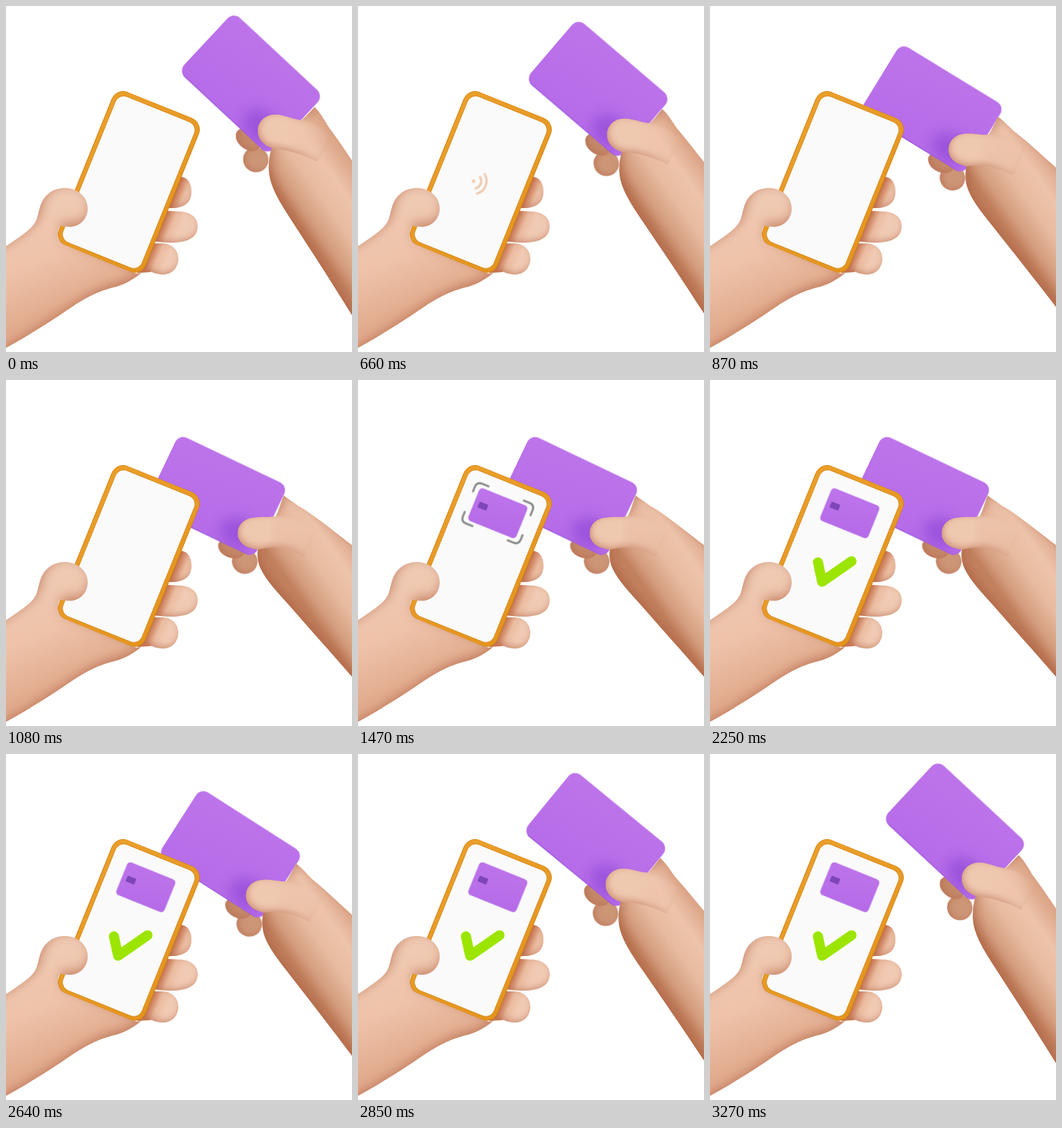
An HTML page that plays this animation: 500x500 px, repeating every 3.3 s.

```html
<!DOCTYPE html>
<html lang="en">
<head>
<meta charset="utf-8">
<title>Card payment</title>
<style>
html, body { margin: 0; width: 100%; height: 100%; overflow: hidden; background: #fff; }
svg { display: block; width: 100vw; height: 100vh; }
.a { animation: 3300ms linear infinite; }

/* The card hand approaches 530-1090 ms and leaves 2300-3080 ms. */
.card { animation-name: card; }
.index { animation-name: index; }
.middle { animation-name: middle; }
.arm { animation-name: arm; }
.thumb { animation-name: thumb; }
.card, .index, .middle, .arm, .thumb { animation-timing-function: cubic-bezier(.333, 0, .667, 1); }

@keyframes card {
  0%, 16.06%, 93.33%, 100% { transform: translate(354px, 112px) rotate(43deg) scale(1); }
  33.03%, 69.7% { transform: translate(304px, 167.5px) rotate(25.5deg) scale(.98); }
}
@keyframes index {
  0%, 16.06%, 93.33%, 100% { transform: translate(350px, 193px) rotate(38deg); }
  33.03%, 69.7% { transform: translate(326px, 243px) rotate(20deg); }
}
@keyframes middle {
  0%, 16.06%, 93.33%, 100% { transform: translate(361px, 222px) rotate(38deg); }
  33.03%, 69.7% { transform: translate(345px, 262px) rotate(20deg); }
}
@keyframes arm {
  0%, 16.06%, 93.33%, 100% {
    d: path("M446 146 C458 158 462 170 470 180 C482 196 492 212 502 226 L540 280 L540 511 L502 450 C470 398 440 352 414 312 C396 284 382 262 380 240 C379 226 381 214 384 205 C372 201 364 192 364 181 C364 167 374 157 390 157 C404 158 414 164 427 165 C434 159 440 152 446 146 Z");
  }
  33.03%, 69.7% {
    d: path("M401 167 C414 175 420 181 428 185 C454 202 478 222 502 240 L540 267 L540 474 L502 431 C468 392 436 356 406 322 C386 300 372 284 366 268 C363 258 363 250 364 245 C350 243 337 238 335 224 C334 210 344 200 358 199 C372 197 380 199 390 197 C394 188 398 176 401 167 Z");
  }
}
@keyframes thumb {
  0%, 16.06%, 93.33%, 100% {
    d: path("M427 165 C414 164 404 158 390 157 C374 157 364 167 364 181 C364 192 372 201 384 205 C400 207 425 212 450 225 L470 190 C455 172 440 168 427 165 Z");
  }
  33.03%, 69.7% {
    d: path("M390 197 C380 199 372 197 358 199 C344 200 334 210 335 224 C337 238 350 243 364 245 C385 240 405 240 430 255 L450 215 C430 200 410 195 390 197 Z");
  }
}

/* Phone screen */
.w1 { animation-name: w1; }
.w2 { animation-name: w2; }
.w3 { animation-name: w3; }
.mini { animation-name: mini; }
.scan { animation-name: scan; }
.tick { animation-name: tick; stroke-dasharray: 1 2; }
@keyframes w1 { 0%, 3% { opacity: 0; } 6%, 20.6% { opacity: 1; } 23.6%, 100% { opacity: 0; } }
@keyframes w2 { 0%, 6% { opacity: 0; } 9%, 20.6% { opacity: 1; } 23.6%, 100% { opacity: 0; } }
@keyframes w3 { 0%, 9% { opacity: 0; } 12%, 20.6% { opacity: 1; } 23.6%, 100% { opacity: 0; } }
@keyframes mini {
  0%, 33% { opacity: 0; transform: scale(.6); }
  39%, 100% { opacity: 1; transform: none; }
}
@keyframes scan {
  0%, 33% { opacity: 0; transform: scale(1.06); }
  38%, 45% { opacity: 1; transform: none; }
  49% { opacity: 1; transform: scale(1.06); }
  53%, 100% { opacity: 0; transform: none; }
}
@keyframes tick {
  0%, 55% { opacity: 0; stroke-dashoffset: 1; }
  55.5% { opacity: 1; stroke-dashoffset: 1; }
  64%, 100% { opacity: 1; stroke-dashoffset: 0; }
}
</style>
</head>
<body>
<svg viewBox="0 0 500 500">
  <defs>
    <linearGradient id="purple" x2=".3" y2="1">
      <stop stop-color="#bd74ea"/><stop offset="1" stop-color="#b66ce8"/>
    </linearGradient>
    <linearGradient id="gold" x2="1" y2="1">
      <stop stop-color="#eb9f2a"/><stop offset="1" stop-color="#e4941d"/>
    </linearGradient>
    <linearGradient id="skinL" gradientUnits="userSpaceOnUse" x1="55" y1="290" x2="110" y2="425">
      <stop stop-color="#f0cab3"/><stop offset=".5" stop-color="#edc2a8"/><stop offset="1" stop-color="#e2ab8e"/>
    </linearGradient>
    <linearGradient id="skinR" gradientUnits="userSpaceOnUse" x1="475" y1="205" x2="390" y2="265">
      <stop stop-color="#e0ab8e"/><stop offset=".25" stop-color="#edc4ab"/><stop offset=".55" stop-color="#e7bb9f"/>
      <stop offset=".85" stop-color="#d49c7e"/><stop offset="1" stop-color="#c2825f"/>
    </linearGradient>
    <linearGradient id="grip" gradientUnits="userSpaceOnUse" x1="235" y1="293" x2="259" y2="303">
      <stop stop-color="#c4704c"/><stop offset=".5" stop-color="#eabb9f"/><stop offset="1" stop-color="#f1cab3"/>
    </linearGradient>
    <linearGradient id="fadeOut">
      <stop offset=".4" stop-color="#fff"/><stop offset=".95" stop-color="#000"/>
    </linearGradient>
    <mask id="fade" maskContentUnits="objectBoundingBox">
      <rect x="-.1" y="-.1" width="1.2" height="1.2" fill="url(#fadeOut)"/>
    </mask>
    <!-- soft inner shade along the lower left rims -->
    <filter id="shade" filterUnits="userSpaceOnUse" x="-80" y="-80" width="660" height="660" color-interpolation-filters="sRGB">
      <feGaussianBlur in="SourceAlpha" stdDeviation="8"/>
      <feOffset dx="4" dy="-5" result="b"/>
      <feComposite in="SourceAlpha" in2="b" operator="out" result="rim"/>
      <feFlood flood-color="#a9583a" flood-opacity=".6"/>
      <feComposite in2="rim" operator="in" result="tone"/>
      <feMerge><feMergeNode in="SourceGraphic"/><feMergeNode in="tone"/></feMerge>
    </filter>
    <filter id="tip" x="-.2" y="-.2" width="1.4" height="1.4" color-interpolation-filters="sRGB">
      <feGaussianBlur in="SourceAlpha" stdDeviation="5"/>
      <feOffset dx="2" dy="-3" result="b"/>
      <feComposite in="SourceAlpha" in2="b" operator="out" result="rim"/>
      <feFlood flood-color="#b2664a" flood-opacity=".55"/>
      <feComposite in2="rim" operator="in" result="tone"/>
      <feMerge><feMergeNode in="SourceGraphic"/><feMergeNode in="tone"/></feMerge>
    </filter>
    <filter id="blur" x="-1" y="-1" width="3" height="3"><feGaussianBlur stdDeviation="9"/></filter>
    <clipPath id="cardClip"><rect x="-89" y="-58.5" width="178" height="117" rx="13"/></clipPath>
  </defs>

  <!-- fingers behind the card -->
  <ellipse class="a middle" rx="18.5" ry="18" fill="#cd9677" filter="url(#tip)"/>
  <ellipse class="a index" rx="20" ry="14" fill="#c48868" filter="url(#tip)"/>

  <g class="a card">
    <rect x="-89" y="-58.5" width="178" height="117" rx="13" fill="url(#purple)"/>
    <g clip-path="url(#cardClip)">
      <ellipse cx="52" cy="36" rx="27" ry="22" fill="#8b45d6" opacity=".6" filter="url(#blur)"/>
      <rect x="-89" y="57" width="178" height="2" fill="#a05ade"/>
    </g>
  </g>
  <path class="a arm" fill="url(#skinR)" filter="url(#shade)"/>
  <g>
    <g mask="url(#fade)"><path class="a thumb" fill="#efc8b0" filter="url(#tip)"/></g>
  </g>

  <!-- fingers behind the phone -->
  <path fill="#c97752" d="M205 340 L218 346 L214 384 L190 386 Z"/>
  <g fill="url(#grip)">
    <path filter="url(#tip)" d="M215 292 L236 292 C256 293 268 285 268 269 C268 255 262 248 254 247 L226 247 Z"/>
    <path filter="url(#tip)" d="M200 338 L222 341 C250 344 277 341 277 318 C277 303 263 297 250 297 L215 295 Z"/>
    <path filter="url(#tip)" d="M190 382 L206 381 C212 386 219 388 227 388 C240 388 249 378 249 365 C249 352 239 343 225 343 L200 343 Z"/>
  </g>

  <g transform="translate(178 253) rotate(22)">
    <rect x="-68" y="-118.500" width="136" height="240" rx="18" fill="#d28416"/>
    <rect x="-67" y="-118" width="134" height="238.500" rx="17.5" fill="url(#gold)"/>
    <rect x="-61.5" y="-112" width="123" height="227.500" rx="13" fill="#fafafa" stroke="#d88d22" stroke-width="1"/>
  </g>

  <g transform="translate(167 253) rotate(21)" fill="none" stroke="#efcbb0" stroke-width="3.4" stroke-linecap="round">
    <circle class="a w1" r="2.6" fill="#efcbb0" stroke="none"/>
    <path class="a w2" d="M6.6 -8.8 A11 11 0 0 1 6.6 8.8"/>
    <path class="a w3" d="M11.3 -15 A18.8 18.8 0 0 1 11.3 15"/>
  </g>

  <g transform="translate(202 192.5) rotate(22)">
    <g class="a mini">
      <rect x="-37.5" y="-25.5" width="75" height="51" rx="5.5" fill="url(#purple)"/>
      <rect x="-30.500" y="-6" width="13.5" height="9" rx="1" fill="#7e46b9"/>
    </g>
    <path class="a scan" fill="none" stroke="#8b8b8b" stroke-width="3" stroke-linecap="round"
      d="M-45 -16 V-23 Q-45 -31 -37 -31 H-27 M28 -31 H37 Q45 -31 45 -23 V-15 M45 16 V23 Q45 31 37 31 H28 M-27 31 H-37 Q-45 31 -45 23 V16"/>
  </g>

  <path class="a tick" pathLength="1" d="M156 263.500 L162 291.500 L204.500 262" fill="none" stroke="#9ce500" stroke-width="14.5" stroke-linecap="round" stroke-linejoin="round"/>

  <path fill="url(#skinL)" filter="url(#shade)" d="M-60 385 L0 347 C18 335 32 326 40 316 C46 308 46 300 49 291 C54 273 68 263 86 263 C106 264 119 278 118 294 C117 310 104 320 91 319 C85 319 80 317 78 318 C73 325 74 340 84 345 L182 385 C187 387 191 387 195 386 C182 397 168 404 150 408 C128 414 112 424 98 433 C70 452 35 475 0 494 L-60 529 Z"/>
</svg>
</body>
</html>
```
